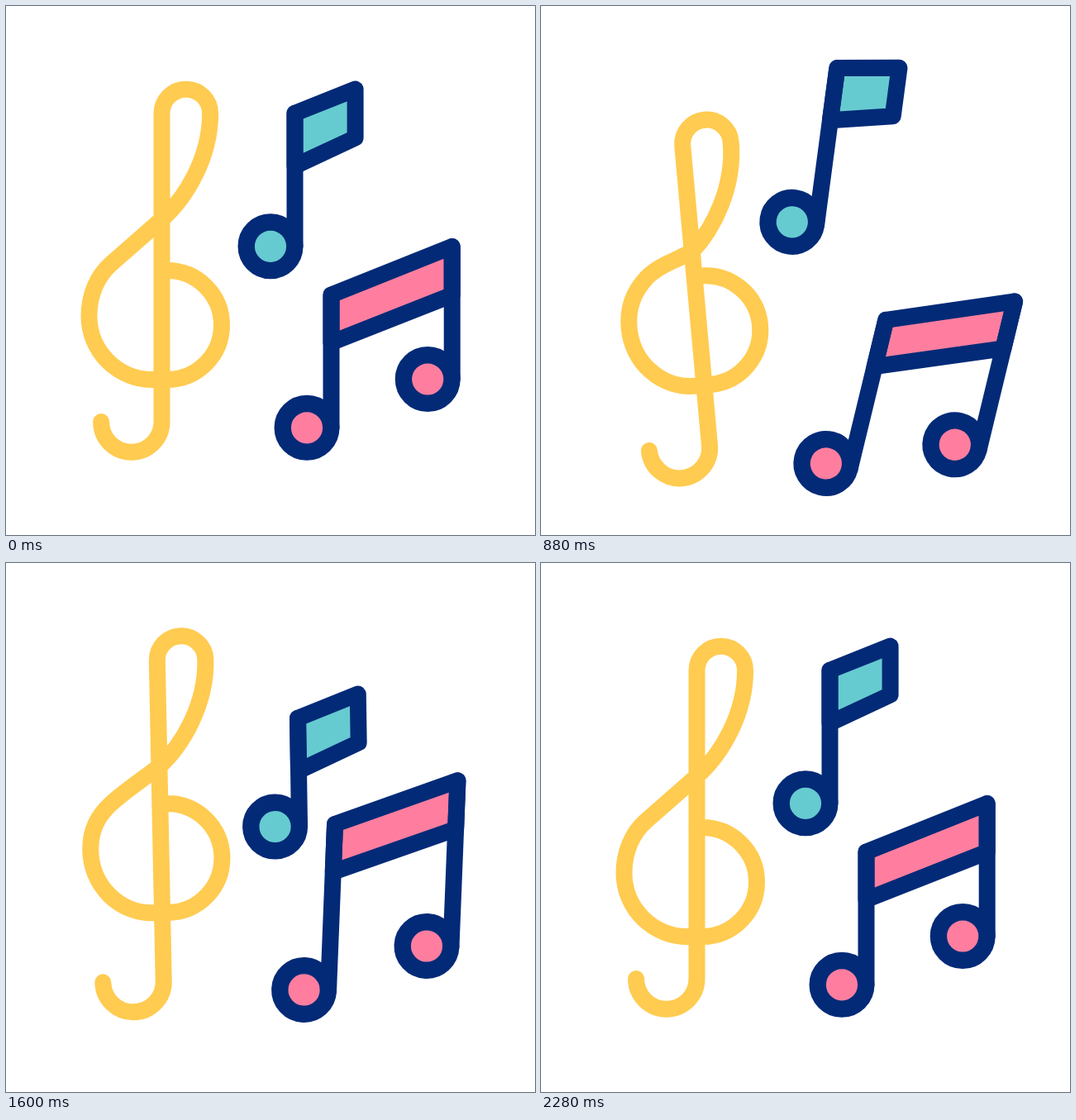
Write an HTML page with a canvas that moves like this. It is 640 px wide and 640 px high and loops after 2400 ms.

```html
<!DOCTYPE html>
<html lang="en">
<head>
<meta charset="utf-8">
<title>Dancing notes</title>
<style>
html, body { margin: 0; width: 100%; height: 100%; overflow: hidden; background: #fff; }
canvas { display: block; width: 640px; height: 640px; }
</style>
</head>
<body>
<canvas id="stage" width="640" height="640"></canvas>
<script>
const ctx = document.getElementById('stage').getContext('2d');
const LOOP = 2400, STEP = 40;
const NAVY = '#032a77', YELLOW = '#ffcb50', TEAL = '#66cbd0', PINK = '#ff7e9f';

// Cubic ease with handles (x1, 0) and (x2, 1)
function ease(u, x2) {
  if (u <= 0) return 0;
  if (u >= 1) return 1;
  const x1 = 0.43;
  let lo = 0, hi = 1, s = 0.5;
  for (let i = 0; i < 24; i++) {
    s = (lo + hi) / 2;
    const r = 1 - s;
    if (3 * r * r * s * x1 + 3 * r * s * s * x2 + s * s * s < u) lo = s; else hi = s;
  }
  return s * s * (3 - 2 * s);
}

// Each part goes rest -> a -> b -> rest at the four times.
const clef = {
  x: 151.8, y: 503, times: [160, 712, 1320, 2280], soft: [0.06, 0.06, 0.06],
  a: { dx: 23, dy: 47.6, turn: -7.1, loop: 32.4, bowl: 0, left: 3, right: 0.8 },
  b: { dx: 4, dy: 6.5, turn: -2.1, loop: -26.5, bowl: -57, left: 5, right: 2.2 }
};
const single = {
  x: 320, y: 290.8, times: [200, 820, 1520, 2280], soft: [0.06, 0.45, 0.06],
  a: { dx: -16.5, dy: -30.3, turn: 7.7, lift: 31.8, tilt: 19.4 },
  b: { dx: 5.7, dy: 29, turn: -0.9, lift: -31, tilt: 1 }
};
const pair = {
  x: 364, y: 510.3, times: [220, 840, 1360, 2180], soft: [0.06, 0.06, 0.06],
  liftTimes: [220, 840, 1400, 2200],
  a: { dx: -19.3, dy: 43.6, turn: 13.75, lift: 24.6 },
  b: { dx: -6.2, dy: 11.1, turn: 4.1, lift: 57.7 }
};

function pose(part, t) {
  const out = {};
  for (const key in part.a) {
    const times = key === 'lift' && part.liftTimes || part.times;
    const [p, q, r] = part.soft.map((x2, i) =>
      ease((t - times[i]) / (times[i + 1] - times[i]), x2));
    out[key] = part.a[key] * p * (1 - q) + part.b[key] * q * (1 - r);
  }
  return out;
}

// Draws in coordinates centred on the part's pivot
function place(part, t, draw) {
  const now = pose(part, t);
  ctx.save();
  ctx.translate(part.x + now.dx, part.y + now.dy);
  ctx.rotate(now.turn * Math.PI / 180);
  draw(now);
  ctx.restore();
}

function line(points, closed, fill) {
  ctx.beginPath();
  points.forEach(([x, y]) => ctx.lineTo(x, y));
  if (closed) ctx.closePath();
  if (fill) {
    ctx.fillStyle = fill;
    ctx.fill();
  }
  ctx.stroke();
}

function head(x, y, fill) {
  ctx.beginPath();
  ctx.arc(x, y, 29.3, 0, Math.PI * 2);
  ctx.fillStyle = fill;
  ctx.fill();
  ctx.lineWidth = 20.4;
  ctx.stroke();
  ctx.lineWidth = 20;
}

function drawClef({ loop, bowl, left, right }) {
  const PI = Math.PI;
  ctx.strokeStyle = YELLOW;
  ctx.translate(-clef.x, -clef.y);
  const cx = 188.5, cy = 258 + loop;
  const jx = 127 + left, jy = 312 + bowl * 0.8;
  const side = 100.5 + left;
  ctx.beginPath();
  ctx.arc(151.8, 503, 36.7, PI, 0, true);
  ctx.lineTo(188.5, 130 + loop);
  ctx.arc(217.8, 130 + loop, 29.3, PI, PI * 2);
  ctx.bezierCurveTo(247.1, 184 + loop, 217, 233 + loop, cx, cy);
  ctx.bezierCurveTo(cx + (jx - cx) / 3, cy + (jy - cy) / 3, jx + 16, jy - 14, jx, jy);
  ctx.bezierCurveTo(jx - 17, jy + 15, side, 350 + bowl, side, 375 + bowl);
  ctx.ellipse(177.5, 375 + bowl, 77 - left, 77, 0, PI, PI / 2, true);
  ctx.arc(195 + right, 386 + bowl, 66, PI / 2, -PI / 2, true);
  ctx.lineTo(188.5, 320 + bowl);
  ctx.stroke();
}

function drawSingle({ lift, tilt }) {
  ctx.strokeStyle = NAVY;
  const x = 29.5, right = 102.6 + tilt * 0.07;
  line([
    [x, -161 - lift], [right, -190.2 - lift + tilt],
    [right, -131.3 - lift + tilt], [x, -97.2 - lift]
  ], true, TEAL);
  line([[x, -161 - lift], [x, 0]]);
  head(0, 0, TEAL);
}

function drawPair({ lift }) {
  ctx.strokeStyle = NAVY;
  const x = 29.5, right = 175.7;
  line([
    [x, -160.8 - lift], [right, -219.3 - lift],
    [right, -160.7 - lift], [x, -103 - lift]
  ], true, PINK);
  line([[x, -160.8 - lift], [x, 0]]);
  line([[right, -219.3 - lift], [right, -58.8]]);
  head(0, 0, PINK);
  head(146.2, -58.8, PINK);
}

function draw(t) {
  ctx.fillStyle = '#fff';
  ctx.fillRect(0, 0, 640, 640);
  ctx.lineWidth = 20;
  ctx.lineCap = ctx.lineJoin = 'round';
  place(clef, t, drawClef);
  place(single, t, drawSingle);
  place(pair, t, drawPair);
}

const start = performance.now();
function tick() {
  const t = (performance.now() - start) % LOOP;
  draw(Math.floor(t / STEP) * STEP);
  requestAnimationFrame(tick);
}
tick();
</script>
</body>
</html>
```
